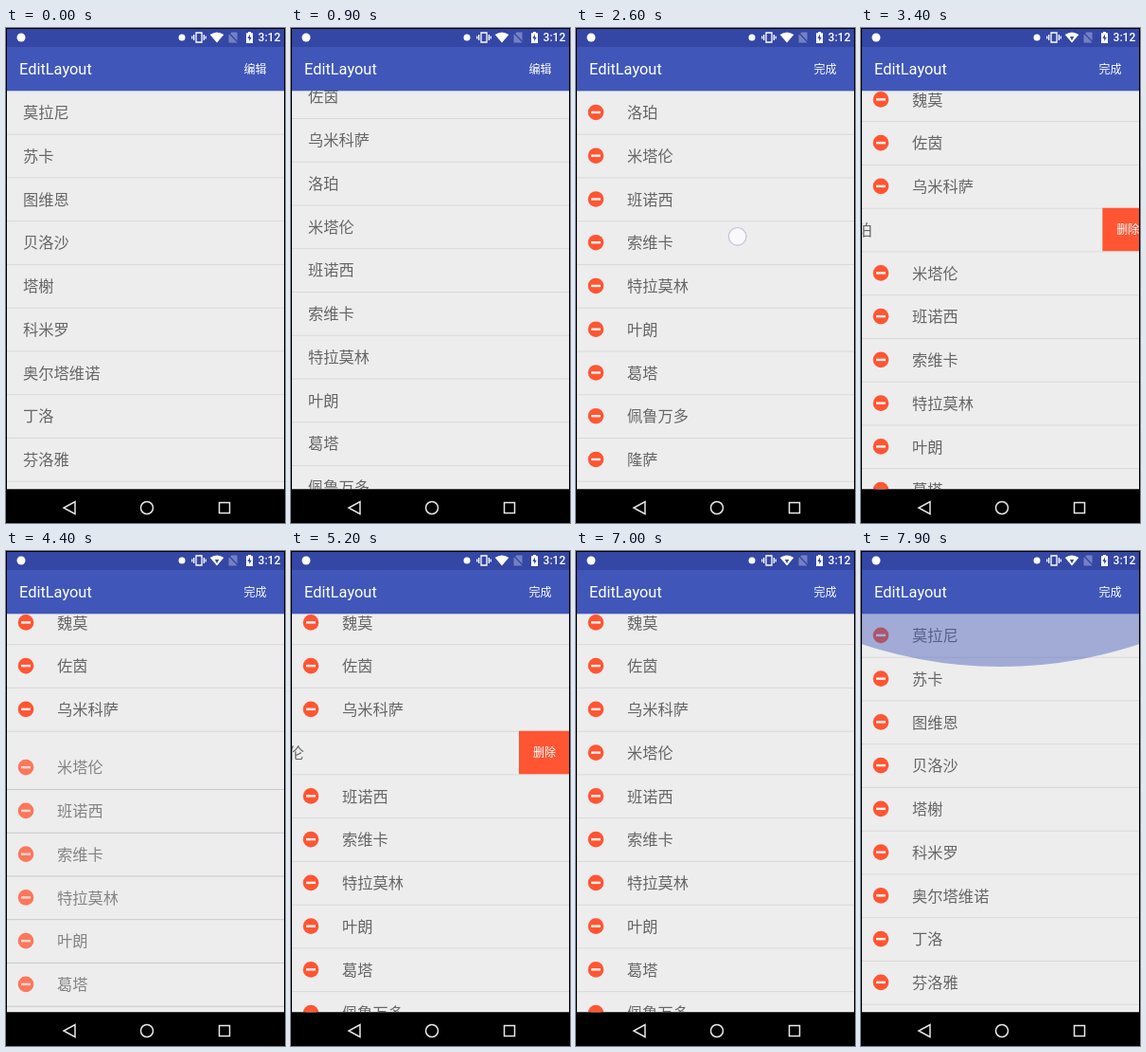
Write an HTML page with a canvas that moves like this. It is 295x522 px and loops after 8000 ms.

```html
<!DOCTYPE html>
<html lang="zh-CN">
<head>
<meta charset="utf-8">
<title>EditLayout</title>
<style>
html, body { margin: 0; width: 100%; height: 100%; overflow: hidden; background: #000; }
canvas { display: block; width: 295px; height: 522px; }
</style>
</head>
<body>
<canvas id="stage"></canvas>
<script>
const W = 295, H = 522, LOOP = 8000;
const TOP = 66, BOTTOM = 486.5, LEFT = 1, RIGHT = 294, ROW = 45.75;
const EDIT_SHIFT = 36, BUTTON = 53, REMOVED = 12;
const BLUE = '#4057b9', DARK_BLUE = '#3447a5', RED = '#ff5533', WHITE = '#fff';
const FONT = "Roboto, 'Noto Sans CJK SC', 'Noto Sans CJK', sans-serif";
const names = ('莫拉尼 苏卡 图维恩 贝洛沙 塔榭 科米罗 奥尔塔维诺 丁洛 芬洛雅 魏莫 佐茵 ' +
  '乌米科萨 洛珀 米塔伦 班诺西 索维卡 特拉莫林 叶朗 葛塔 佩鲁万多 隆萨 杜弥安').split(' ');

// Touch marks: start, end, x, first y, last y
const touches = [
  [500, 700, 172, 390, 160], [1800, 1890, 263, 43, 43], [3280, 3390, 21, 213, 213],
  [3980, 4090, 268, 213, 213], [4780, 4890, 21, 213, 213], [5280, 5390, 21, 259, 259],
  [6580, 6690, 150, 361, 361], [7480, 7690, 172, 160, 390]
];
const wifiBusy = [[1200, 2100], [3300, 4900], [6200, LOOP]];

const canvas = document.getElementById('stage');
const ctx = canvas.getContext('2d');
const scale = window.devicePixelRatio || 1;
canvas.width = W * scale;
canvas.height = H * scale;

const ramp = (t, a, b) => Math.min(1, Math.max(0, (t - a) / (b - a)));
const easeOut = (u, power = 5) => 1 - (1 - u) ** power;
const easeInOut = u => 0.5 - 0.5 * Math.cos(Math.PI * u);

function rect(x, y, w, h, color) {
  ctx.fillStyle = color;
  ctx.fillRect(x, y, w, h);
}

function disc(x, y, r, color) {
  ctx.fillStyle = color;
  ctx.beginPath();
  ctx.arc(x, y, r, 0, 7);
  ctx.fill();
}

function text(str, x, y, size, color, align = 'left', weight = 400) {
  ctx.font = `${weight} ${size}px ${FONT}`;
  ctx.textAlign = align;
  ctx.fillStyle = color;
  ctx.fillText(str, x, y);
}

function shape(path, color) {
  ctx.fillStyle = color;
  ctx.fill(new Path2D(path));
}

function outline(path, color, width) {
  ctx.strokeStyle = color;
  ctx.lineWidth = width;
  ctx.stroke(new Path2D(path));
}

function scrollAt(t) {
  return 582.25 * easeOut(ramp(t, 450, 1500), 3)
    - 157 * easeInOut(ramp(t, 2426, 3000))
    - 425.25 * ramp(t, 7450, 7800) ** 1.5;
}

// How far a row is swiped open, 0 to 1
function openAt(i, t) {
  const move = (a, b) => easeOut(ramp(t, a, b));
  if (i === REMOVED) return move(3260, 3720);
  if (i === REMOVED + 1) return move(4830, 5230) - move(5400, 5800);
  if (i === REMOVED + 2) return move(5420, 5820) - move(6560, 6980);
  return 0;
}

function drawRow(i, t, scroll, edit) {
  const shift = easeInOut(ramp(t, 4250, 4500));
  const after = i > REMOVED;
  const y = TOP + i * ROW - scroll - (after ? shift * ROW : 0);
  if (y > BOTTOM || y + ROW < TOP) return;

  const alpha = i === REMOVED ? 1 - ramp(t, 4100, 4220)
    : after ? 1 - shift * (1 - shift) : 1;
  if (alpha === 0) return;

  const dx = edit - (EDIT_SHIFT + BUTTON) * openAt(i, t);
  const mid = y + ROW / 2;
  ctx.globalAlpha = alpha;
  disc(dx - 15, mid, 8.3, RED);
  rect(dx - 20, mid - 1.2, 10, 2.4, '#fff2ee');
  text(names[i], 18 + dx, mid + 6.2, 16.3, '#666');
  if (dx < 0) {
    rect(RIGHT + dx, y, BUTTON, ROW, RED);
    text('删除', RIGHT + dx + BUTTON / 2 + 0.5, mid + 4.6, 12, WHITE, 'center', 500);
  }
  ctx.globalAlpha = 1;
  rect(LEFT, y + ROW - 0.1, RIGHT - LEFT, 1, after && alpha < 1 ? '#c8c8c8' : '#d9d9d9');
}

function drawGlow(t) {
  const grow = 0.95 * easeOut(ramp(t, 7780, 7900), 2);
  if (!grow) return;
  const r = 440;
  ctx.save();
  ctx.translate(147.5, TOP);
  ctx.scale(1, grow);
  ctx.globalAlpha = 0.44 * grow / 0.95;
  disc(0, 59 - r, r, BLUE);
  ctx.restore();
}

function drawList(t, scroll) {
  const edit = EDIT_SHIFT * easeInOut(ramp(t, 1850, 2190));
  rect(LEFT, TOP, RIGHT - LEFT, BOTTOM - TOP, '#ededed');
  ctx.save();
  ctx.beginPath();
  ctx.rect(LEFT, TOP, RIGHT - LEFT, BOTTOM - TOP);
  ctx.clip();
  names.forEach((_, i) => drawRow(i, t, scroll, edit));
  drawGlow(t);
  ctx.restore();
}

function drawStatus(t) {
  rect(LEFT, 1, RIGHT - LEFT, 19, DARK_BLUE);
  disc(16, 10, 4.5, WHITE);
  disc(186, 10, 3.5, WHITE);
  outline('M201 5h6v10h-6zM198.7 7v6M209.3 7v6M196.8 8.5v3M211.2 8.5v3', WHITE, 1.3);
  shape('M223 15.5L215.7 7Q223 1.8 230.3 7Z', WHITE);
  if (wifiBusy.some(([a, b]) => t >= a && t < b)) shape('M220.8 9h4.4L223 13Z', DARK_BLUE);
  shape('M238.5 4.5h6v11h-9v-8z', '#7482c4');
  outline('M235 4.5L246 16', DARK_BLUE, 1.3);
  shape('M254 5.2h2v-1.2h3v1.2h2v10.8h-7z', WHITE);
  shape('M258 6.5l-2.6 4.4h1.8v3.2l2.6-4.4h-1.8z', DARK_BLUE);
  text('3:12', 290.2, 14.3, 12, WHITE, 'right', 500);
}

function drawBars(t) {
  drawStatus(t);
  rect(LEFT, 20, RIGHT - LEFT, TOP - 20, BLUE);
  rect(LEFT, TOP, RIGHT - LEFT, 1, 'rgba(64,87,185,.3)');
  text('EditLayout', 14, 49, 16.4, WHITE);
  text(t < 1850 ? '编辑' : '完成', 263.5, 47.5, 12, WHITE, 'center', 500);
  rect(0, BOTTOM, W, H - BOTTOM, '#000');
  outline('M73 499.5v13L61 506Z', '#e8e8e8', 1.5);
  outline('M142.5 506a6.5 6.5 0 1 0 13 0a6.5 6.5 0 1 0-13 0', '#e8e8e8', 1.5);
  outline('M225.5 500.5h11v11h-11z', '#e8e8e8', 1.5);
}

function drawTouch(x, y) {
  disc(x, y, 9.3, 'rgba(250,250,253,.9)');
  ctx.strokeStyle = '#c3c3dc';
  ctx.lineWidth = 1.2;
  ctx.stroke();
}

function draw(t) {
  const scroll = scrollAt(t);
  ctx.setTransform(scale, 0, 0, scale, 0, 0);
  rect(0, 0, W, H, '#000');
  drawList(t, scroll);
  drawBars(t);
  for (const [a, b, x, y0, y1] of touches) {
    if (t >= a && t < b) drawTouch(x, y0 + (y1 - y0) * ramp(t, a, b));
  }
  if (t >= 2480 && t < 2900) drawTouch(170.7, 768.7 - scroll);
}

function tick() {
  draw(performance.now() % LOOP);
  requestAnimationFrame(tick);
}
tick();
</script>
</body>
</html>
```
